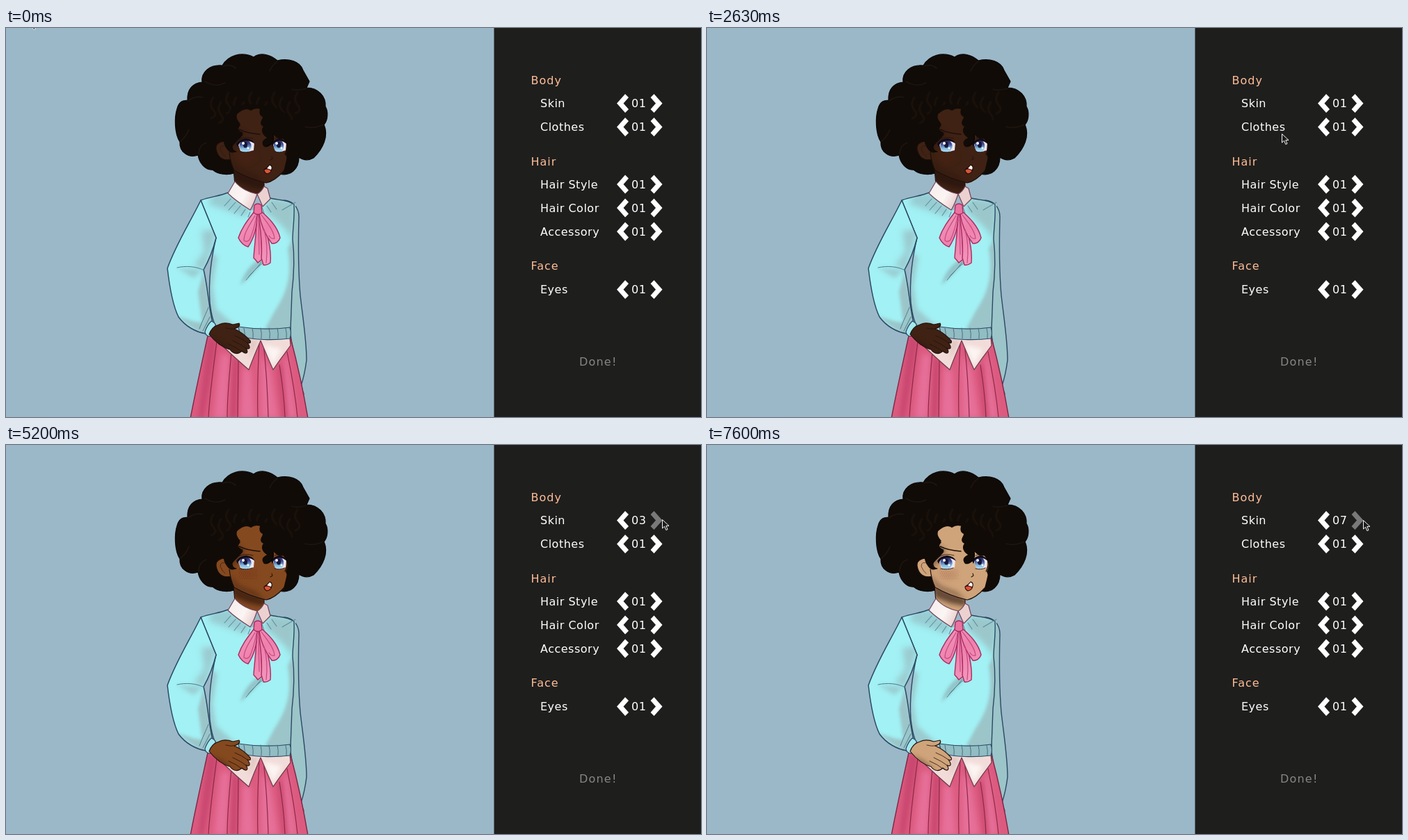
Animation of 999x560 px, one loop 8 s. Source, as an HTML page with a canvas:

```html
<!DOCTYPE html>
<html lang="en">
<head>
<meta charset="utf-8">
<title>Character creator</title>
<style>
html, body { margin: 0; width: 999px; height: 560px; overflow: hidden; background: #9bb8c8; }
canvas { display: block; }
</style>
</head>
<body>
<canvas id="stage" width="999" height="560"></canvas>
<script>
const W = 999, H = 560, LOOP = 8000;
const view = document.getElementById('stage').getContext('2d');
const layer = document.createElement('canvas');
layer.width = W;
layer.height = H;
const g = layer.getContext('2d');

const INK = '#2c4863', HAIR = '#110b07', RIM = '#090504', PINK = '#a92b60';
const SKINS = ['#3f2213', '#70401f', '#85491f', '#9a5a2c', '#ae7443', '#c08c5f', '#d0a47a'];
const SKIN_TIMES = [4230, 5200, 5770, 6430, 6970, 7600];

function shape(d, fill, stroke, width = 1.3) {
  const p = new Path2D(d);
  if (fill) { g.fillStyle = fill; g.fill(p); }
  if (stroke) { g.strokeStyle = stroke; g.lineWidth = width; g.stroke(p); }
}
const line = (d, color, width = 1) => shape(d, null, color, width);

function inside(d, paint) {
  g.save();
  g.clip(new Path2D(d));
  paint();
  g.restore();
}
function soft(d, color, blur = 3) {
  g.save();
  g.filter = `blur(${blur}px)`;
  shape(d, color);
  g.restore();
}
function fade(x0, y0, x1, y1, ...colors) {
  const f = g.createLinearGradient(x0, y0, x1, y1);
  colors.forEach((c, i) => f.addColorStop(i / (colors.length - 1), c));
  return f;
}

function drawSkirt() {
  const skirt = 'M290 443C282 480 273 520 265 562L434 562C427 520 418 480 409 446Z';
  shape(skirt, '#dc5a7f');
  inside(skirt, () => {
    soft('M309 470L298 562L318 562L322 470Z M340 490L336 562L358 562L352 490Z M366 470L366 562L392 562L380 490Z M398 480L404 562L418 562L404 470Z', '#e6709a', 4);
    soft('M290 443L276 562L284 562L304 450Z M326 470L322 562L331 562L334 480Z M391 490L398 562L404 562L396 480Z', '#c94870', 3);
  });
  line('M303 451C298 490 293 525 291 560M324 466C321 500 318 530 318 560M334 478L333 560M364 454C362 490 361 525 362 560M370 454C374 490 376 525 377 560M393 485C397 510 400 535 401 560M404 466C411 500 416 530 419 560', '#8c2947', 1.2);
  line(skirt, '#7c2743', 1.4);
}

function drawShirtTails() {
  const tails = 'M300 446C313 460 334 479 349 492C354 478 360 464 366 450C372 464 378 479 384 492C393 478 402 467 409 457L408 445Z';
  shape(tails, '#f2dcd9');
  inside(tails, () => {
    soft('M370 456L384 486L396 462Z', '#fbf4f2', 3);
    soft('M352 448L350 478L362 450Z', '#dfc2c0', 3);
  });
  line(tails, '#6b3a4c', 1.2);
}

function drawBackArm(skin) {
  shape('M422 512L428 526L426 536L421 526Z', skin, '#2a1712', 1);
  shape('M400 248C412 249 421 258 421 272C420 310 420 350 423 385C427 420 432 450 432 478C430 494 427 506 424 515C416 485 411 460 409 440L404 290Z', '#9bc5c9', INK, 1.4);
}

function drawSweater() {
  const body = 'M319 237C307 242 293 243 280 248L302 302C294 335 291 365 293 395C295 412 297 422 302 430L338 434L409 434C410 412 411 396 411 380C414 355 415 330 412 304C412 286 415 268 416 254C405 249 392 248 380 245L369 256L352 263Z';
  shape(body, '#a2f1f4');
  inside(body, () => {
    soft('M380 244L418 250L412 310C408 290 390 280 370 262Z', '#9bc7cb', 4);
    soft('M418 290L405 318C410 350 408 375 386 408L372 434L418 438Z', '#9bc5c9', 2);
    soft('M296 238L322 236L352 262L344 272L316 262L291 254Z', '#97ccd2', 4);
    soft('M290 318L304 330L297 372L302 404L338 436L290 436Z', '#9acbd0', 3);
    soft('M371 334C362 347 350 358 337 370C342 352 352 340 366 332Z', '#91c3c8', 2);
  });
  line('M319 237C307 242 293 243 280 248L302 302C294 335 291 365 293 395C295 412 297 422 302 430M380 245C392 248 405 247 414 254C415 275 412 290 412 304C415 330 414 355 411 380L409 434', INK, 1.4);
  line('M314 256L323 246M320 262L330 251M328 267L337 256M338 270L344 261M348 272L351 265M371 267L368 258M381 265L375 256M389 261L382 251M397 262L416 251', '#5b8e9c', 1.1);
  line('M345 363C351 355 360 347 367 337M348 359C356 349 364 342 371 337', '#517d89', 1);

  const hem = 'M334 430C360 434 386 434 408 431Q411 439 408 447C384 450 356 449 337 444Z';
  shape(hem, '#91bdc3', INK, 1.2);
  for (let x = 342; x < 408; x += 12) line(`M${x} 432Q${x + 2} 440 ${x + 1} 447`, '#486f84');
}

function drawFrontArm() {
  const arm = 'M280 248C264 281 244 312 232 346C235 372 240 400 248 416C258 430 274 438 287 440L297 425C291 399 290 372 284 348C293 332 298 318 302 302Z';
  shape(arm, '#a2f1f4');
  inside(arm, () => {
    soft('M281 292L304 290L286 350L270 342L285 322Z', '#9acbd0', 4);
    soft('M244 414L272 423L282 424L276 380L284 350L302 430L286 446Z', '#9bc5c9', 2);
    soft('M246 345L282 348L270 360Z', '#98cdd2', 3);
  });
  line(arm, INK, 1.5);
  line('M246 345C258 342 274 343 285 349M278 433C282 422 288 410 291 402M283 436L293 416', '#4c7c8d');
  shape('M286 437Q289 428 295 422Q303 425 301 431L293 444Q286 443 286 437Z', '#a2e9ed', INK, 1.2);
}

function drawHand(skin) {
  const hand = 'M292 441C294 435 299 429 306 427C314 423 321 425 326 427L335 425Q338 430 328 433C337 437 344 442 351 450Q353 455 347 453C351 458 352 464 345 461C349 467 346 471 339 465C334 470 327 470 322 463C310 460 300 451 292 441Z';
  shape(hand, skin);
  inside(hand, () => soft('M295 446L312 454L328 468L308 466Z', '#24120f55', 3));
  line(hand, '#22120e', 1.2);
  line('M329 443Q339 447 347 453M326 450Q337 455 345 461M320 455Q332 460 339 466M316 432Q323 434 328 433', '#22120ecc');
}

function drawHair() {
  const hair = 'M328 209C318 212 305 211 297 204C287 205 278 195 276 183C262 188 249 178 250 164C242 152 242 128 246 116C249 104 257 104 261 104C260 88 269 79 282 78C280 64 293 52 311 54C319 40 338 33 356 42C367 34 381 39 390 47C406 43 423 48 427 61L436 77L432 86C449 86 460 99 459 113C464 121 462 134 457 139C464 155 456 174 442 187C435 191 427 190 421 186C421 203 409 214 393 210Z';
  shape(hair, HAIR, RIM, 1.2);
  line('M286 77Q301 86 315 79M312 55Q323 51 330 58M390 48Q382 54 379 62M432 87Q418 91 411 88M262 105Q272 97 283 100M277 182Q277 169 288 165M456 139Q441 146 430 142M421 186Q412 174 415 162M251 163Q260 155 263 146', '#211710', 1.2);
  g.save();
  g.globalAlpha = .55;
  for (let i = 0; i < 12; i++) {
    const x = 298 + i * 11, y = 100 + 8 * Math.sin(i * 2.1);
    line(`M${x} ${y}q-7 10 0 18t-3 12`, '#21150d', 3);
  }
  g.restore();
}

function drawNeck(skin) {
  const neck = 'M327 202L329 226C340 236 352 242 362 240L371 231L371 220Z';
  shape(neck, skin);
  inside(neck, () => soft('M324 200L374 222L371 232L350 228L327 219Z', '#22100c99', 3));
  line(neck, '#1d0f0a', 1.1);
}

function drawCollar() {
  shape('M329 221C337 231 350 237 361 239C358 248 355 256 351 262C340 255 328 247 319 238Z', fade(325, 232, 360, 250, '#f8efef', '#fbf5f3', '#e9cccc'), '#71465a', 1.2);
  shape('M371 228L376 231L380 246L369 257L361 239Q367 236 371 228Z', '#ecd1d1', '#71465a', 1.2);
}

function drawBow() {
  const fill = fade(336, 265, 392, 330, '#f299bd', '#ee80ac', '#f49bc0');
  [
    'M360 266C361 290 357 312 356 331Q360 335 362 338L368 333L366 268Z',
    'M365 267C374 289 382 314 380 338Q375 342 370 341L367 331C369 309 365 288 363 268Z',
    'M357 264C348 276 339 287 334 302C337 309 343 314 348 315C357 302 361 284 361 268Z',
    'M367 264C377 273 390 285 394 302C392 308 387 311 382 310C372 297 366 282 364 268Z'
  ].forEach(d => shape(d, fill, PINK, 1.4));
  line('M358 270C350 284 342 295 342 306Q346 309 350 305C355 294 358 282 360 271M367 269C376 281 385 292 386 303Q381 304 378 299M363 276L364 326M371 290Q377 312 374 338', '#c64a80', 1.2);
  shape('M357 255Q362 251 367 255L368 266Q362 271 356 266Z', '#ea739f', PINK, 1.4);
}

function drawEye(x, y, w) {
  g.save();
  g.translate(x, y);
  shape(`M${-w} -5Q0 -13 ${w} -5L${w - 1} 6Q2 11 ${4 - w} 7Z`, '#eee6ee');
  g.beginPath();
  g.ellipse(-1, 0, w * .72, 9, 0, 0, 7);
  g.fillStyle = fade(0, -9, 0, 9, '#242052', '#3d4a91', '#83b8de', '#b4e5f3');
  g.fill();
  g.fillStyle = '#181637';
  g.beginPath();
  g.ellipse(-1, -2, 3, 4.5, 0, 0, 7);
  g.fill();
  g.fillStyle = '#fff';
  g.beginPath();
  g.arc(-4, -4, 2, 0, 7);
  g.arc(3, 3, 1.4, 0, 7);
  g.fill();
  shape(`M${-w - 2} -3Q${-w + 2} -10 0 -11Q${w - 2} -10 ${w + 1} -3Q${w - 4} -7 0 -8Q${-w + 2} -7 ${-w} 1Z`, '#100b18');
  line(`M${3 - w} 8Q1 10 ${w - 3} 7`, '#2a1b24', .9);
  g.restore();
}

function drawFace(skin, level) {
  const ear = 'M323 166C312 160 301 165 302 174C304 186 312 192 324 189Z';
  shape(ear, skin, '#1c0f0a', 1.1);
  line('M318 171Q308 166 308 175Q311 182 315 185', '#29160f99');

  const face = 'M333 122C340 115 354 113 369 114C367 128 372 140 378 149L405 158C407 174 403 192 399 206C392 214 383 221 374 223C357 219 340 212 328 205C324 196 321 187 321 178C325 167 334 163 341 153C330 150 333 145 337 140C330 136 330 128 333 122Z';
  shape(face, skin);
  inside(face, () => {
    soft('M330 180Q346 176 361 184Q357 196 340 195Z', '#70201822', 4);
    soft('M320 185L328 207L374 225L360 211L336 202Z', '#26110c55', 3);
    soft('M330 142L344 150L338 166L320 180L318 158Z', '#26110c55', 3);
    if (level > 2) {
      g.fillStyle = level > 4 ? '#7a463444' : '#4b251666';
      for (let row = 0; row < 6; row++)
        for (let col = 0; col < 9; col++) g.fillRect(335 + col * 3 + row % 2 * 1.5, 179 + row * 2.6, 1, 1);
    }
  });
  line('M321 179C322 188 324 197 328 205C340 212 357 219 374 223C383 221 392 214 399 206', '#1d0f0a', 1.2);

  drawEye(345, 170, 12);
  drawEye(393, 170, 10);
  line('M335 146C343 150 353 152 365 153', '#1d100d', 1.5);
  line('M333 161Q343 155 355 159M386 159Q394 156 401 160', '#24110e', .8);
  line('M382 185L383 188L380 190', '#2b1510', 1.1);

  const mouth = 'M371 204Q376 201 379 197Q383 198 382 203Q381 209 375 210Q371 208 371 204Z';
  shape(mouth, '#32100f');
  inside(mouth, () => {
    shape('M375 202L379 197L383 201L381 204Z', '#fff7f1');
    shape('M370 205Q377 201 382 207L376 212Z', '#dd5335');
  });
  line(mouth, '#1d0b09', 1.1);
}

function drawBangs() {
  shape('M366 112C386 108 412 126 424 154L421 188C414 198 405 193 402 182C407 174 404 165 399 159C392 162 387 156 384 153C387 164 379 173 371 171C365 163 372 160 375 158C366 152 367 145 370 142C362 137 369 132 369 128C361 124 366 116 366 112Z', HAIR);
  shape('M326 112L340 114C328 122 330 130 337 138C330 142 333 148 341 151C335 158 327 161 325 168Q323 177 331 178Q323 182 318 175C311 167 310 150 314 136Z', HAIR);
  shape('M328 116Q345 106 371 112L371 119Q360 113 352 119Q344 113 332 124Z', HAIR);
  line('M384 153Q387 167 374 170M399 159Q408 169 401 182M325 168Q324 177 331 178', RIM, 1.1);
}

function text(str, x, y, color, gap) {
  g.font = '16px "DejaVu Sans", sans-serif';
  g.letterSpacing = gap + 'px';
  g.fillStyle = color;
  g.fillText(str, x, y);
}
function arrow(x, y, dir, color) {
  const p = [[0, 0], [12, -13.5], [17, -8.5], [9.5, 0], [17, 8.5], [12, 13.5]];
  g.fillStyle = color;
  g.beginPath();
  p.forEach(([dx, dy]) => g.lineTo(x + dx * dir, y + dy));
  g.fill();
}

function drawPanel(level, hover) {
  g.fillStyle = '#1e1e1d';
  g.fillRect(701.5, 0, 298, H);
  [['Body', 81], ['Hair', 198], ['Face', 348]].forEach(([s, y]) => text(s, 754.5, y, '#ffbd96', 1));
  [['Skin', 108.5], ['Clothes', 142.5], ['Hair Style', 225], ['Hair Color', 259], ['Accessory', 293], ['Eyes', 376.5]].forEach(([s, y], i) => {
    text(s, 768, Math.round(y + 5.5), '#fff', .5);
    text('0' + (i ? 1 : level), 899, Math.round(y + 5.5), '#fff', .6);
    arrow(878, y, 1, '#fff');
    arrow(943.5, y, -1, !i && hover ? '#797979' : '#fff');
  });
  text('Done!', 824, 486, '#868684', 1.2);
}

function paintScene(level, hover) {
  const skin = SKINS[level - 1];
  g.fillStyle = '#9bb8c8';
  g.fillRect(0, 0, W, H);
  g.lineJoin = g.lineCap = 'round';
  drawBackArm(skin);
  drawSkirt();
  drawShirtTails();
  drawHair();
  drawNeck(skin);
  drawSweater();
  drawFrontArm();
  drawHand(skin);
  drawCollar();
  drawBow();
  drawFace(skin, level);
  drawBangs();
  drawPanel(level, hover);
}

// time, x, y of the pointer tip
const TRACK = [
  [0, 34, -13], [330, 541, 272], [1170, 541, 272], [1200, 548, 272], [1300, 554, 272],
  [1770, 554, 272], [2030, 589, 260], [2370, 589, 260], [2820, 972, 86], [2900, 964, 68],
  [3070, 943, 107], [5840, 943, 107], [5870, 943, 108]
];
function pointerAt(t) {
  const i = TRACK.findIndex(k => k[0] > t);
  if (i < 0) return TRACK[TRACK.length - 1].slice(1);
  const [t0, x0, y0] = TRACK[i - 1], [t1, x1, y1] = TRACK[i];
  const u = (t - t0) / (t1 - t0), e = u * u * (3 - 2 * u);
  return [Math.round(x0 + (x1 - x0) * e), Math.round(y0 + (y1 - y0) * e)];
}
const POINTER = new Path2D('M.5 .5L.5 13L3.5 10.2L5.8 15.5L8 14.5L5.8 9.4L10 9.4Z');
function drawPointer(x, y) {
  view.save();
  view.translate(x, y);
  view.fillStyle = '#1c1c1c';
  view.strokeStyle = '#f4f4f4';
  view.lineWidth = 1;
  view.fill(POINTER);
  view.stroke(POINTER);
  view.restore();
}

let painted = '';
function render(t) {
  const level = 1 + SKIN_TIMES.filter(s => t >= s).length;
  const [x, y] = pointerAt(t);
  const hover = x >= 924 && x <= 944 && y >= 95 && y <= 122;
  const state = level + '/' + hover;
  if (state !== painted) {
    paintScene(level, hover);
    painted = state;
  }
  view.drawImage(layer, 0, 0);
  drawPointer(x, y);
}

const start = performance.now();
function tick() {
  render((performance.now() - start) % LOOP);
  requestAnimationFrame(tick);
}
tick();
</script>
</body>
</html>
```
